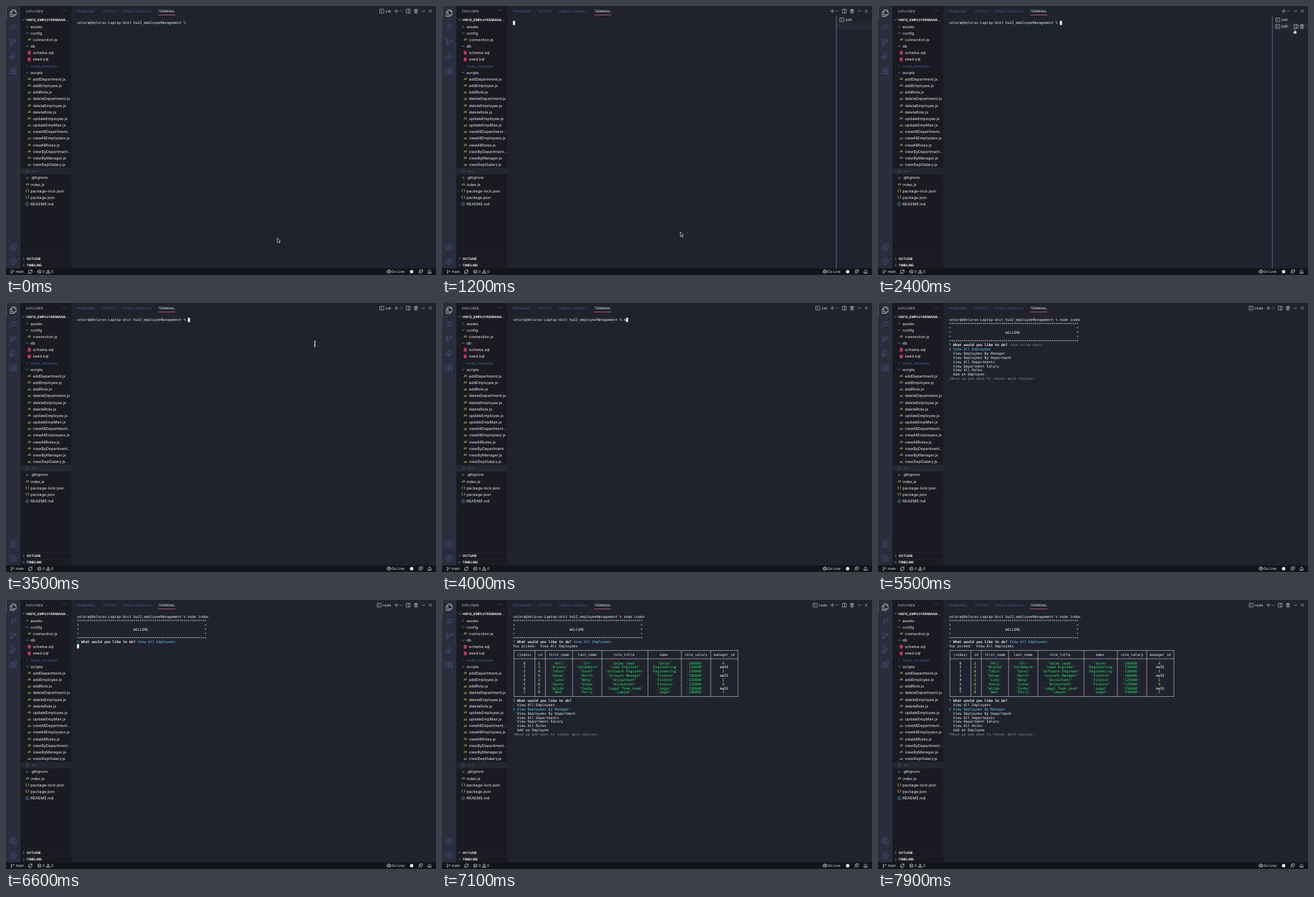
Recreate the animation shown at these times as an HTML page. Size 600 by 375 pixels, loop 8000 ms.

```html
<!DOCTYPE html>
<html lang="en">
<head>
<meta charset="utf-8">
<title>Terminal session</title>
<style>
  html, body { margin: 0; width: 100%; height: 100%; overflow: hidden; background: #20222d; }
  svg { display: block; width: 100vw; height: 100vh; }
  text { white-space: pre; text-rendering: geometricPrecision; font-family: Inter, "Open Sans", sans-serif; }
  .mono { font-family: "DejaVu Sans Mono", "Liberation Mono", monospace; font-size: 4.85px; }
  .line { fill: none; stroke-width: .6; stroke-linejoin: round; stroke-linecap: round; }
</style>
</head>
<body>
<svg id="stage" viewBox="0 0 600 375"></svg>
<script>
const LOOP = 8000;
const C = {
  panel: '#20222d', side: '#191a22', rail: '#2a2d3c', status: '#13141a', row: '#242631',
  text: '#eeeeec', soft: '#c4c5ca', blue: '#4a5d98', dim: '#4b5468', gray: '#878993',
  green: '#27e65f', yellow: '#e9ee78', cyan: '#5fd3ee', pink: '#e55f9c', js: '#cbcb41', sash: '#675a8c'
};
const stage = document.getElementById('stage');

function add(parent, tag, attrs, content) {
  const node = document.createElementNS('http://www.w3.org/2000/svg', tag);
  for (const key in attrs) node.setAttribute(key, attrs[key]);
  if (content !== undefined) node.textContent = content;
  parent.appendChild(node);
  return node;
}
const group = (parent = stage) => add(parent, 'g', {});
const rect = (parent, x, y, width, height, fill) => add(parent, 'rect', { x, y, width, height, fill });
const show = (node, on) => { node.style.display = on ? '' : 'none'; };

// y is the visual middle of the line
function label(parent, x, y, content, size = 5.4, fill = C.text, weight = 400) {
  return add(parent, 'text', { x, y: y + size * .36, 'font-size': size, fill, 'font-weight': weight }, content);
}

const ICONS = {
  files: 'M-1.5 -4.5H1.8L4 -2.3V2.5H-1.5ZM1.8 -4.5V-2.3H4M-1.5 -2H-4V4.5H1.5V2.5',
  search: 'M-1.3 1.3L-4.3 4.5M-2 -1.2A3 3 0 1 0 4 -1.2A3 3 0 1 0 -2 -1.2',
  branch: 'M-2.5 -1.5V1.8M2.8 -.6C2.8 1-2.5 0-2.5 2M-3.8 -2.8A1.3 1.3 0 1 0 -1.2 -2.8A1.3 1.3 0 1 0 -3.8 -2.8M-3.8 3.1A1.3 1.3 0 1 0 -1.2 3.1A1.3 1.3 0 1 0 -3.8 3.1M1.5 -1.8A1.3 1.3 0 1 0 4.1 -1.8A1.3 1.3 0 1 0 1.5 -1.8',
  debug: 'M-1.5 -1V-4.5L4.5 -.3L.8 2.2M-4 1.8A1.7 2.1 0 1 0 -.6 1.8A1.7 2.1 0 1 0 -4 1.8M-4.7 .3L-4 1M.1 .3L-.6 1M-4.9 2H-4M-.6 2H.3M-4.7 4L-3.8 3.3M.1 4L-.8 3.3',
  blocks: 'M-4.3 -2.3H-.2V4.3H-4.3ZM-4.3 1H4V4.3H-.2M4 1V4.3M.8 -4.5H4.5V-.8H.8Z',
  account: 'M-4.5 0A4.5 4.5 0 1 0 4.5 0A4.5 4.5 0 1 0 -4.5 0M-1.6 -1A1.6 1.6 0 1 0 1.6 -1A1.6 1.6 0 1 0 -1.6 -1M-2.8 3.3C-2.4 .3 2.4 .3 2.8 3.3',
  gear: 'M-1.3 0A1.3 1.3 0 1 0 1.3 0A1.3 1.3 0 1 0 -1.3 0M-.8 -4.3H.8L1.2 -3L2.5 -3.7L3.7 -2.5L3 -1.2L4.3 -.8V.8L3 1.2L3.7 2.5L2.5 3.7L1.2 3L.8 4.3H-.8L-1.2 3L-2.5 3.7L-3.7 2.5L-3 1.2L-4.3 .8V-.8L-3 -1.2L-3.7 -2.5L-2.5 -3.7L-1.2 -3Z',
  right: 'M-.9 -1.8L.9 0L-.9 1.8',
  down: 'M-1.8 -.9L0 .9L1.8 -.9',
  plus: 'M-2.6 0H2.6M0 -2.6V2.6',
  close: 'M-1.8 -1.8L1.8 1.8M1.8 -1.8L-1.8 1.8',
  split: 'M-2.5 -2.6H2.5V2.6H-2.5ZM0 -2.6V2.6',
  trash: 'M-2.4 -1.8H2.4M-.8 -1.8V-2.7H.8V-1.8M-1.8 -1.8V2.7H1.8V-1.8M-.6 -.7V1.6M.6 -.7V1.6',
  shell: 'M-2.7 -2.6H2.7V2.6H-2.7ZM-1.2 -1.2L.2 0L-1.2 1.2',
  sync: 'M-2.4 .3A2.4 2.4 0 0 1 2 -1.4M2.4 -.3A2.4 2.4 0 0 1 -2 1.4M2.2 -2.6V-1.2H.8M-2.2 2.6V1.2H-.8',
  error: 'M-2.4 0A2.4 2.4 0 1 0 2.4 0A2.4 2.4 0 1 0 -2.4 0M-.9 -.9L.9 .9M.9 -.9L-.9 .9',
  warn: 'M0 -2.4L2.5 2.2H-2.5ZM0 -.7V.7M0 1.4V1.5',
  live: 'M0 0V2.6M-1.2 1A1.6 1.6 0 1 1 1.2 1M-2 2A2.7 2.7 0 1 1 2 2',
  person: 'M-2 -.9A1.1 1.1 0 1 0 .2 -.9A1.1 1.1 0 1 0 -2 -.9M-2.7 2.5C-2.5 .3 .7 .3 .9 2.5M-.5 -2.6H2.7V.2H1.6L.9 1',
  bell: 'M-2.3 1.5C-1.4 .6 -1.9 -2.4 0 -2.4C1.9 -2.4 1.4 .6 2.3 1.5ZM-.6 1.7V2.4H.6V1.7',
  info: 'M-2.3 0A2.3 2.3 0 1 0 2.3 0A2.3 2.3 0 1 0 -2.3 0M0 -.2V1.2M0 -1.2V-1.1'
};
function icon(parent, name, x, y, stroke = C.soft, scale = 1) {
  return add(parent, 'path', { class: 'line', d: ICONS[name], stroke, transform: `translate(${x} ${y}) scale(${scale})` });
}

// Window frame
rect(stage, 0, 0, 600, 375, C.panel);
rect(stage, 20, 0, 71, 366, C.side);
rect(stage, 0, 0, 20, 366, C.rail);
rect(stage, 0, 0, .7, 19.5, '#8a4a76');
['files', 'search', 'branch', 'debug', 'blocks'].forEach((name, i) =>
  icon(stage, name, 10, 10 + 20 * i, i ? C.blue : C.text));
icon(stage, 'account', 10, 336, C.blue);
icon(stage, 'gear', 10, 356, C.blue);

// Explorer tree
const ROW = 9.17;
label(stage, 28, 7.2, 'EXPLORER', 4.58, C.soft);
label(stage, 79, 6.5, '···', 5.4, C.soft, 700);
icon(stage, 'down', 24.5, 19.2, C.soft, .85);
label(stage, 28.5, 19.2, 'HW12_EMPLOYEEMANA…', 4.58, C.text, 700);
const scripts = ['addDepartment', 'addEmployee', 'addRole', 'deleteDepartment', 'deleteEmployee', 'deleteRole',
  'updateEmployee', 'updateEmpMan', 'viewAllDepartment…', 'viewAllEmployees', 'viewAllRoles',
  'viewByDepartment…', 'viewByManager', 'viewDeptSalary'];
const tree = [
  ['right', 'assets'], ['down', 'config'], ['js', 'connection.js', 1], ['down', 'db'],
  ['sql', 'schema.sql', 1], ['sql', 'seed.sql', 1], ['right', 'node_modules', 0, C.blue], ['down', 'scripts'],
  ...scripts.map(s => ['js', s.endsWith('…') ? s : s + '.js', 1]),
  ['gear', '.env', 0, C.dim], ['git', '.gitignore'], ['js', 'index.js'],
  ['json', 'package-lock.json'], ['json', 'package.json'], ['info', 'README.md']
];
function treeIcon(kind, x, y, color) {
  if (kind === 'js') label(stage, x - 2.3, y, 'JS', 3.8, C.js, 700);
  else if (kind === 'json') label(stage, x - 2.5, y - .2, '{ }', 4.6, C.js, 700);
  else if (kind === 'sql') {
    add(stage, 'rect', { x: x - 2, y: y - 2.5, width: 4.2, height: 5, rx: 1.2, fill: '#ee3d72' });
    for (const dy of [-1, .8]) rect(stage, x - 2, y + dy, 4.2, .45, C.side);
  } else if (kind === 'git') add(stage, 'circle', { cx: x, cy: y, r: 1.8, fill: '#3d4c58' });
  else if (kind === 'gear') icon(stage, kind, x, y, '#5d6675', .55);
  else icon(stage, kind, x, y, kind === 'info' ? '#519aba' : color || C.soft, kind === 'info' ? 1 : .85);
}
tree.forEach(([kind, name, depth, color], i) => {
  const y = 28.6 + ROW * i;
  if (name === '.env') rect(stage, 20, y - ROW / 2, 71, ROW, C.row);
  treeIcon(kind, depth ? 32.3 : 29.6, y, color);
  label(stage, depth ? 37.6 : 34.2, y, name, 5.4, color);
});
['OUTLINE', 'TIMELINE'].forEach((name, i) => {
  const y = 352.3 + ROW * i;
  rect(stage, 20, y - ROW / 2, 71, .4, '#2a2c38');
  icon(stage, 'right', 24.5, y, C.soft, .85);
  label(stage, 28.5, y, name, 4.58, C.text, 700);
});

// Status bar
rect(stage, 0, 365.8, 600, 9.2, C.status);
icon(stage, 'branch', 9, 370.4, C.text, .6);
label(stage, 13.5, 370.4, 'main', 5);
icon(stage, 'sync', 34, 370.4, C.text);
icon(stage, 'error', 46.5, 370.4, C.text);
label(stage, 51, 370.4, '0', 5);
icon(stage, 'warn', 59, 370.4, C.text);
label(stage, 63, 370.4, '0', 5);
icon(stage, 'live', 534.3, 370.4, C.text);
label(stage, 538, 370.4, 'Go Live', 5);
add(stage, 'circle', { cx: 566, cy: 370.4, r: 2.4, fill: C.text });
icon(stage, 'person', 578.5, 370.4, C.text);
icon(stage, 'bell', 591, 370.4, C.text);

// Panel header
[[99, 'PROBLEMS'], [134.3, 'OUTPUT'], [163.3, 'DEBUG CONSOLE'], [212.5, 'TERMINAL']].forEach(([x, name], i) =>
  label(stage, x, 7.2, name, 4.58, i === 3 ? C.text : C.blue));
rect(stage, 212.3, 12.2, 24, .7, C.pink);
icon(stage, 'down', 582.5, 7.2);
icon(stage, 'close', 592, 7.2);
const paneTools = group();
icon(paneTools, 'split', 561.5, 7.2);
icon(paneTools, 'trash', 572, 7.2);
const newTab = group();
icon(newTab, 'plus', 544.7, 7.2);
icon(newTab, 'down', 551.3, 7.2, C.soft, .75);
const shellTab = group();
const shellIcon = icon(shellTab, 'shell', 0, 7.2);
const shellName = label(shellTab, 0, 7.2, 'zsh', 4.7);

// Terminal list on the right
const list = group();
rect(list, 551, 23.9, 49, ROW, '#272a36');
rect(list, 549.7, 14, 1, 351.8, C.sash);
const tabRow = (parent, y) => {
  icon(parent, 'shell', 558, y);
  label(parent, 563, y, 'zsh');
};
tabRow(list, 19.2);
const secondTab = group(list);
tabRow(secondTab, 28.5);
const rowTools = group(list);
icon(rowTools, 'split', 583.5, 28.5);
icon(rowTools, 'trash', 591.5, 28.5);

// Terminal text grid
const LEFT = 99, CHAR = 2.92, TOP = 23.6, LEAD = 5.84;
const colX = col => LEFT + col * CHAR;
const rowY = row => TOP + row * LEAD;
function put(parent, col, row, content, fill = C.text, weight = 400) {
  return add(parent, 'text', { class: 'mono', x: colX(col), y: rowY(row) + 1.75, fill, 'font-weight': weight }, content);
}
const PROMPT = 'velora@Veloras-Laptop-Unit hw12_employeeManagement % ';
const COMMAND = 'node index';
const prompt = put(stage, 0, 0, PROMPT);
const caret = rect(stage, 0, 0, 3, 5.9, C.text);

const banner = group();
for (const row of [1, 5]) put(banner, 0, row, '*'.repeat(62));
for (const row of [2, 3, 4]) {
  put(banner, 0, row, '*');
  put(banner, 61, row, '*');
}
put(banner, 27, 3, 'WELCOME');

const choices = ['View All Employees', 'View Employees By Manager', 'View Employees By Department',
  'View All Departments', 'View Department Salary', 'View All Roles', 'Add an Employee'];
function question(row, tail, color) {
  const g = group();
  put(g, 0, row, '?', C.green, 700);
  put(g, 2, row, 'What would you like to do?', C.text, 700);
  if (tail) put(g, 29, row, tail, color);
  return g;
}
function menu(row, selected, hint) {
  const g = question(row, hint, C.gray);
  choices.forEach((choice, i) => {
    const on = i === selected;
    put(g, 0, row + 1 + i, (on ? '❯ ' : '  ') + choice, on ? C.cyan : C.text);
  });
  put(g, 0, row + 8, '(Move up and down to reveal more choices)', C.gray);
  return g;
}

function buildTable(row) {
  const g = group();
  put(g, 0, row - 1, 'You picked:  View All Employees');
  const head = ['(index)', 'id', 'first_name', 'last_name', 'role_title', 'name', 'role_salary', 'manager_id'];
  const people = [
    [1, 'Pell', 'Orr', 'Sales Lead', 'Sales', '100000', 4],
    [3, 'Brynna', 'Valdemora', 'Lead Engineer', 'Engineering', '150000', null],
    [4, 'Tobin', 'Garel', 'Software Engineer', 'Engineering', '120000', 1],
    [5, 'Devan', 'Marth', 'Account Manager', 'Finance', '160000', null],
    [2, 'Luko', 'Weng', 'Accountant', 'Finance', '125000', 1],
    [6, 'Senna', 'Stone', 'Accountant', 'Finance', '125000', 5],
    [7, 'Wilda', 'Fenby', 'Legal Team Lead', 'Legal', '250000', null],
    [8, 'Ned', 'Parry', 'Lawyer', 'Legal', '190000', 7]
  ];
  const show = v => typeof v === 'string' ? `'${v}'` : String(v);
  const tint = v => typeof v === 'string' ? C.green : v === null ? C.text : C.yellow;
  const end = row + 3 + people.length;
  const vline = col => `M${colX(col + .5)} ${rowY(row)}V${rowY(end)}`;
  let edge = 0, grid = vline(0);
  head.forEach((name, c) => {
    const cells = people.map((p, i) => c ? p[c - 1] : i);
    const width = 2 + Math.max(name.length, ...cells.map(v => show(v).length));
    const center = s => edge + 1 + Math.floor((width - s.length) / 2);
    put(g, center(name), row + 1, name);
    cells.forEach((v, i) =>
      put(g, center(show(v)), row + 3 + i, show(v), c ? tint(v) : C.text, v === null ? 700 : 400));
    edge += width + 1;
    grid += vline(edge);
  });
  for (const r of [row, row + 2, end]) grid += `M${colX(.5)} ${rowY(r)}H${colX(edge + .5)}`;
  add(g, 'path', { class: 'line', d: grid, stroke: '#c9cace', 'stroke-width': .5 });
  return g;
}

// Each part with the span of time in which it is visible
const spans = [
  [banner, 5300, LOOP],
  [menu(6, 0, '(Use arrow keys)'), 5400, 6600],
  [question(6, choices[0], C.cyan), 6600, LOOP],
  [buildTable(8), 6750, LOOP],
  [menu(20, 0, '(Use arrow keys)'), 6850, 7100],
  [menu(20, 1), 7100, LOOP],
  [list, 1100, 2900],
  [secondTab, 1300, 2900],
  [rowTools, 2250, 2900]
];

// Mouse pointer
const pointers = {
  arrow: 'M0 0V6.4L1.5 5.1L2.5 7.4L3.6 6.9L2.6 4.7H4.5Z',
  hand: 'M-.6 .3Q0 -.6 .6 .3V2.4L2.8 3V5L2 6.8H-1.2L-2.6 4.2L-1.8 3.6L-.6 4.6Z',
  beam: 'M-1.3 -3.8Q0 -3.8 0 -3Q0 -3.8 1.3 -3.8M0 -3V3M-1.3 3.8Q0 3.8 0 3Q0 3.8 1.3 3.8M-.8 .9H.8'
};
const pointer = add(stage, 'path', { 'stroke-linejoin': 'round' });
const track = [[0, 378.5, 323.3], [100, 378.5, 323.3], [200, 332.5, 315], [1400, 332.5, 315],
  [2350, 581.5, 32], [2550, 581.5, 32], [2700, 591, 29], [2950, 591, 29], [3450, 431, 57], [LOOP, 431, 57]];
function pointerAt(t) {
  const i = track.findIndex(k => k[0] > t);
  const [t0, x0, y0] = track[i - 1], [t1, x1, y1] = track[i];
  const p = (t - t0) / (t1 - t0), e = p * p * (3 - 2 * p);
  return [x0 + (x1 - x0) * e, y0 + (y1 - y0) * e];
}
function drawPointer(t) {
  show(pointer, t < 4000);
  const kind = t < 2250 ? 'arrow' : t < 3000 ? 'hand' : 'beam';
  const [x, y] = pointerAt(t);
  pointer.setAttribute('d', pointers[kind]);
  pointer.setAttribute('fill', kind === 'beam' ? 'none' : kind === 'hand' ? '#f4f4f4' : '#111');
  pointer.setAttribute('stroke', kind === 'hand' ? '#111' : '#f4f4f4');
  pointer.setAttribute('stroke-width', kind === 'beam' ? .9 : .6);
  pointer.setAttribute('transform', `translate(${x} ${y})`);
}

function caretCell(t, typed) {
  if (t < 1100) return null;
  if (t < 1500) return [0, 0];
  if (t < 5100) return [PROMPT.length + typed, 0];
  if (t < 5300) return [0, 1];
  return t >= 6600 && t < 6750 ? [0, 7] : null;
}

function drawHeader(t) {
  const listed = t >= 1100 && t < 2900;
  const running = t >= 5200;
  show(shellTab, !listed);
  show(paneTools, !listed || t < 1300);
  newTab.setAttribute('transform', `translate(${listed && t >= 1300 ? 21.5 : 0} 0)`);
  shellIcon.setAttribute('transform', `translate(${running ? 521 : 524.5} 7.2)`);
  shellName.setAttribute('x', running ? 526 : 529.8);
  shellName.textContent = running ? 'node' : 'zsh';
}

function render(t) {
  const typed = Math.max(0, Math.min(COMMAND.length, Math.floor((t - 4000) / 100) + 1));
  prompt.textContent = PROMPT + COMMAND.slice(0, typed);
  show(prompt, t < 1100 || t >= 1500);
  const cell = caretCell(t, typed);
  show(caret, cell);
  if (cell) {
    caret.setAttribute('x', colX(cell[0]));
    caret.setAttribute('y', rowY(cell[1]) - 2.95);
  }
  for (const [node, from, to] of spans) show(node, t >= from && t < to);
  drawHeader(t);
  drawPointer(t);
}

const start = performance.now();
function tick() {
  render((performance.now() - start) % LOOP);
  requestAnimationFrame(tick);
}
tick();
</script>
</body>
</html>
```
